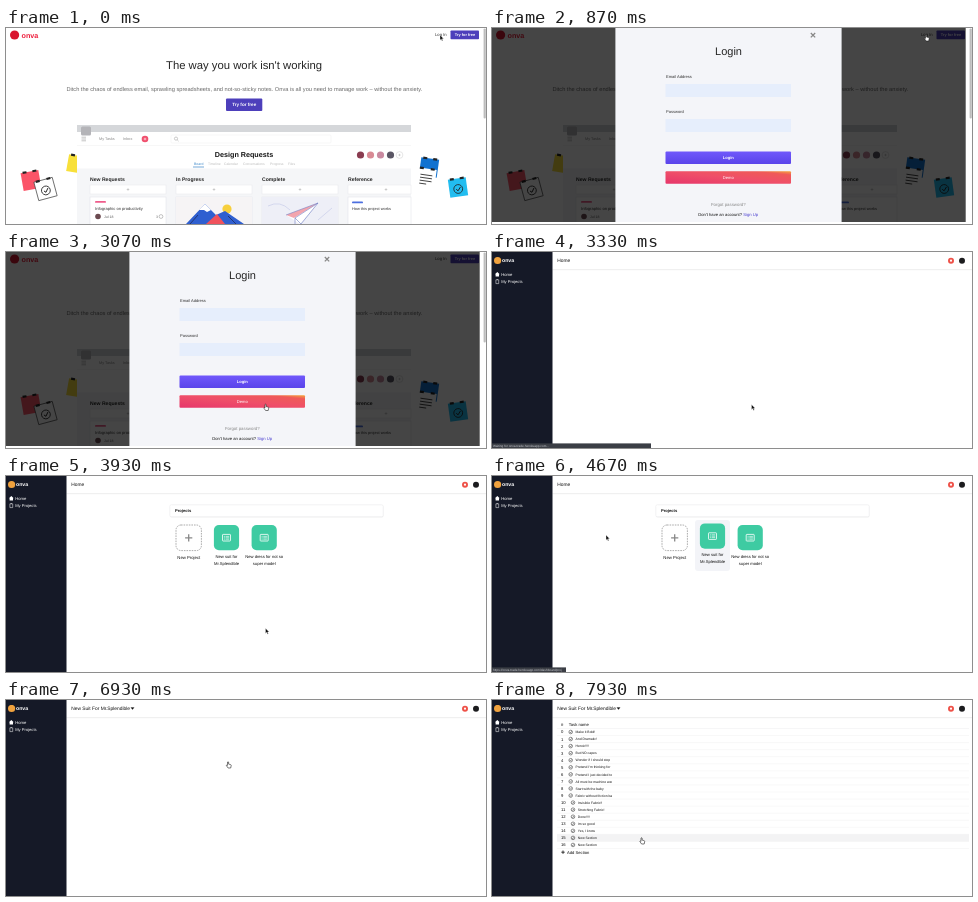
Animation, 480 px wide and 196 px high, one loop 8 s. Source, as an HTML page:

```html
<!DOCTYPE html>
<html lang="en">
<head>
<meta charset="utf-8">
<title>Onva walkthrough</title>
<style>
  html, body { margin: 0; width: 100%; height: 100%; overflow: hidden; background: #fff; }
  svg { display: block; width: 100vw; height: 100vh; }
  text { font-family: "Liberation Sans", Arial, sans-serif; text-rendering: geometricPrecision; white-space: pre; }
  .bold { font-weight: 700; }
</style>
</head>
<body>
<svg id="stage" viewBox="0 0 480 196" xmlns="http://www.w3.org/2000/svg"></svg>
<script>
const LOOP = 8000;
const stage = document.getElementById('stage');

// Markup helpers; text is placed by its vertical middle.
const rect = (x, y, w, h, fill, more = '') =>
  `<rect x="${x}" y="${y}" width="${w}" height="${h}" fill="${fill}" ${more}/>`;
const disc = (x, y, r, fill, more = '') =>
  `<circle cx="${x}" cy="${y}" r="${r}" fill="${fill}" ${more}/>`;
const line = (d, color, width = 0.6, more = '') =>
  `<path d="${d}" fill="none" stroke="${color}" stroke-width="${width}" ${more}/>`;
const shape = (d, fill) => `<path d="${d}" fill="${fill}"/>`;
const text = (x, y, size, fill, str, more = '') =>
  `<text x="${x}" y="${y + size * 0.35}" font-size="${size}" fill="${fill}" ${more}>${str}</text>`;
const mid = 'text-anchor="middle"';
const bold = 'class="bold"';
const group = (id, body, more = '') => `<g id="${id}" ${more}>${body}</g>`;
const plus = (x, y, r, color, width) =>
  line(`M${x - r} ${y}h${2 * r}M${x} ${y - r}v${2 * r}`, color, width);

const CHECK = disc(0, 1.5, 4.4, 'none', 'stroke="#222" stroke-width=".8"') +
  line('M-2 1.5l1.6 1.8l3-3.6', '#222', 0.9);
const LINES = line('M-6 -3h12M-6 0h12M-6 3h12M-6 6h7', '#222', 0.8);

function note(x, y, size, turn, fill, mark = '', edge = 'none') {
  const h = size / 2;
  return `<g transform="translate(${x} ${y}) rotate(${turn})">` +
    rect(-h, -h, size, size, fill, `stroke="${edge}" stroke-width=".7"`) +
    rect(-h + 2, -h - 1, 4, 2.2, '#222') + rect(h - 6, -h - 1, 4, 2.2, '#222') +
    mark + '</g>';
}

function board() {
  let s = rect(71, 97, 334, 99, '#fff') + rect(71, 97, 334, 7, '#d5d7da') +
    rect(75, 98.5, 10, 9, '#b4b4b8', 'rx="1.5"') +
    line('M75.5 109.2h4.5M75.5 111h4.5M75.5 112.8h4.5', '#888', 0.5) +
    text(93, 111, 3.8, '#888', 'My Tasks') + text(117, 111, 3.8, '#888', 'Inbox') +
    disc(139, 111, 3.3, '#f0506e') + plus(139, 111, 1.3, '#fff', 0.6) +
    rect(165, 107, 160, 8, '#fff', 'rx="1" stroke="#eee" stroke-width=".5"') +
    disc(170, 110.6, 1.6, 'none', 'stroke="#999" stroke-width=".5"') +
    line('M171.2 111.8l1.4 1.4', '#999', 0.5) +
    line('M71 117.5h334', '#eee', 0.5) +
    text(238, 126.5, 7.2, '#151515', 'Design Requests', `${mid} ${bold}`) +
    text(188, 136, 3.5, '#3a86c8', 'Board') + line('M187 139h11', '#3a86c8', 0.7);
  [[202, 'Timeline'], [218, 'Calendar'], [237, 'Conversations'], [264, 'Progress'], [282, 'Files']]
    .forEach(([x, label]) => s += text(x, 136, 3.4, '#bbb', label));
  ['#8a3c50', '#d88a94', '#c98aa0', '#5a5664']
    .forEach((c, i) => s += disc(354.5 + i * 10, 127, 3.6, c));
  s += disc(393.5, 127, 3.4, '#fff', 'stroke="#ccc" stroke-width=".5"') + plus(393.5, 127, 1.2, '#999', 0.4);
  s += rect(71, 140.5, 334, 55.5, '#f5f6f8');
  ['New Requests', 'In Progress', 'Complete', 'Reference'].forEach((label, i) => {
    const x = 84 + i * 86, w = i === 3 ? 63 : 76;
    s += text(x, 151, 5.1, '#222', label, bold) +
      rect(x, 157, w, 9, '#fff', 'stroke="#e5e6ea" stroke-width=".5"') +
      plus(x + 38, 161.5, 1.3, '#aaa', 0.5) +
      rect(x, 169, w, 30, '#fff', 'stroke="#dfe0e5" stroke-width=".5"');
  });
  s += rect(89, 173, 11, 1.8, '#ef5c8b', 'rx=".9"') +
    text(89, 180.5, 4.1, '#333', 'Infographic on productivity') +
    disc(92, 188.5, 2.8, '#6b4a50') + text(98, 189, 3.5, '#555', 'Jul 18') +
    text(150, 189, 3.5, '#666', '3') + disc(155, 188.5, 1.9, 'none', 'stroke="#888" stroke-width=".5"') +
    rect(346, 173.5, 11, 1.8, '#4c6fe0', 'rx=".9"') +
    text(346, 181, 3.9, '#333', 'How this project works');
  // Picture cards
  s += rect(170, 169, 76, 27, '#f6f4f5') + disc(221, 181, 4.6, '#f7cf3c') +
    shape('M180 196L199 176L210 187L219 183L238 196z', '#2f5fd0') +
    shape('M193 182L199 176L205 182L201 184L198 182z', '#fff') +
    shape('M200 196L211 186L219 196z', '#f0525c') +
    line('M184 196l8-9M222 188l8 8', '#1d2550', 0.7) +
    rect(256, 169, 76, 27, '#eeeff7') +
    shape('M280 187L312 175L294 196z', '#fff') + shape('M280 187L312 175L288 190z', '#f2a5ae') +
    line('M280 187L312 175L295 196L289 190L312 175M289 190v6', '#6f7fc4', 0.6) +
    line('M262 178q12-6 22 4M312 192l14-12', '#c9cdea', 0.7);
  return s;
}

function landing() {
  return rect(0, 0, 480, 196, '#fff') +
    disc(8.6, 7, 4.6, '#d9152f') + text(15.5, 7, 7.2, '#ee1f3d', 'onva', bold) +
    text(429, 7, 4.2, '#333', 'Log In') +
    rect(444.5, 2.5, 28.5, 8.8, '#4d3fbb', 'rx=".8"') +
    text(459, 7, 3.9, '#fff', 'Try for free', `${mid} ${bold}`) +
    text(238, 37.5, 11.3, '#262626', "The way you work isn't working", mid) +
    text(238.3, 61, 5.66, '#686868',
      'Ditch the chaos of endless email, sprawling spreadsheets, and not-so-sticky notes. Onva is all you need to manage work – without the anxiety.',
      mid) +
    rect(220, 70.5, 36.3, 12.5, '#4d3fbb', 'rx="1"') +
    text(238.2, 76.8, 4.6, '#fff', 'Try for free', `${mid} ${bold}`) +
    note(70, 136, 17, 10, '#f8e03a') + note(25, 152.5, 18, -10, '#fb5468') +
    note(39.5, 161, 19, -15, '#fff', CHECK, '#444') +
    note(423, 139.5, 18, 8, '#1172d0') + note(420, 150, 19, 8, '#fff', LINES) +
    note(452, 159.5, 18, -8, '#22bdf0', CHECK) + board();
}

const field = (y, label) =>
  text(174, y, 4.05, '#333', label) + rect(173.5, y + 7, 125.5, 13, '#e6eefc');

function modal() {
  return rect(0, 0, 473.7, 194, '#000', 'opacity=".73"') + rect(0, 194, 476, 2, '#fff') +
    rect(123.4, 0, 226.2, 194, '#f4f5f9') +
    line('M318.8 5l4.4 4.4M323.2 5l-4.4 4.4', '#888', 1.3) +
    text(236.5, 23, 11, '#262626', 'Login', mid) +
    field(49, 'Email Address') + field(84, 'Password') +
    rect(173.5, 123.5, 125.5, 12.5, 'url(#violet)', 'rx="1"') +
    text(236.3, 129.7, 4.1, '#fff', 'Login', `${mid} ${bold}`) +
    rect(173.5, 143.2, 125.5, 12.6, 'url(#coral)', 'rx="1"') +
    text(236.3, 149.5, 4.1, '#fff', 'Demo', mid) +
    text(236.3, 176, 4.35, '#888', 'Forgot password?', mid) +
    text(236.2, 187, 4.2, '#111', 'Don\'t have an account? <tspan fill="#4a3fd0">Sign Up</tspan>', mid);
}

function shell() {
  return rect(0, 0, 480, 196, '#fff') + rect(60.5, 17, 419.5, 1.2, '#f0f0f0') +
    rect(0, 0, 60.5, 196, '#151927') + group('menuHot', rect(0, 26, 60.5, 7.4, '#2b2f3c')) +
    disc(5.6, 8.5, 3.6, '#f0a23e') + text(10, 8.5, 5.2, '#fff', 'onva', bold) +
    shape('M2.9 22.3L5.3 20.1L7.7 22.3H7V24.4H3.6V22.3z', '#fff') +
    text(9.2, 22.3, 4.2, '#fff', 'Home') +
    line('M3.9 27.8h2.8v3.8h-2.8zM4.7 27.5h1.2', '#fff', 0.5) +
    text(9.2, 29.7, 4.1, '#fff', 'My Projects') +
    text(65.3, 8.7, 4.85, '#111', '', 'id="title"') +
    disc(459, 8.7, 3, '#ee5148') + disc(459, 8.7, 1.1, '#fff') + disc(470, 8.7, 3, '#1c1c1e');
}

function tile(id, cx, top, bottom) {
  return group(id + 'Bg', rect(cx - 17.5, 44, 35, 51, '#f3f4f8', 'rx="3"')) +
    group(id, rect(cx - 12.6, 49, 25.2, 25.3, '#3ecba2', 'rx="5"') +
      rect(cx - 4, 58.4, 8, 6.6, 'none', 'rx=".6" stroke="#fff" stroke-width=".8"') +
      line(`M${cx - 2.6} 60.4h1m.7 0h3.6M${cx - 2.6} 61.8h1m.7 0h3.6M${cx - 2.6} 63.2h1m.7 0h3.6`, '#fff', 0.6) +
      text(cx, 80.4, 4.15, '#111', top, mid) + text(cx, 87.3, 4.15, '#111', bottom, mid));
}

function projects() {
  return rect(164, 29.6, 213.5, 12, '#0000000d', 'rx="1.5"') +
    rect(163.8, 28.8, 213.4, 12, '#fff', 'rx="1.5" stroke="#e6e6e8" stroke-width=".5"') +
    text(169, 35, 4.1, '#111', 'Projects', bold) +
    rect(170, 49, 25.4, 25.6, '#fff', 'rx="5" stroke="#888" stroke-width=".7" stroke-dasharray="1.6 1"') +
    plus(182.7, 61.8, 3.6, '#888', 1.3) + text(182.8, 81.2, 4.25, '#111', 'New Project', mid) +
    tile('suit', 220.5, 'New suit for', 'Mr.Splendible') +
    tile('dress', 258.2, 'New dress for not so', 'super model');
}

const TASKS = ['Make it Bold!', 'And Dramatic!', 'Heroic!!!!', 'But NO capes', 'Wonder if I should stop',
  "Pretend I'm thinking for", 'Pretend I just decided to', 'All must be machine was', 'Start with the baby',
  'Fabric without friction ba', 'Invisible Fabric!!', 'Stretching Fabric!', 'Done!!!!', 'Im so good',
  'Yes, I know', 'New Section', 'New Section'];
const ROW = 7.06, FIRST = 32;

function tasks() {
  let s = group('rowHot', rect(65, -ROW / 2, 412, ROW, '#f3f3f4')) +
    text(69, 25, 4.2, '#111', '#') + text(76.7, 25, 4.2, '#111', 'Task name') +
    line('M65 28.5h412', '#e8e8ea', 0.4);
  TASKS.forEach((name, i) => {
    const y = FIRST + i * ROW, x = i < 10 ? 78.7 : 81;
    s += text(69, y, 4.2, '#111', i) +
      disc(x, y, 1.8, 'none', 'stroke="#222" stroke-width=".5"') +
      line(`M${x - 0.9} ${y}l.7 .8l1.2-1.5`, '#222', 0.5) +
      text(x + 4.8, y, 3.4, '#111', name, 'clip-path="url(#column)"') +
      line(`M65 ${y + ROW / 2}h412`, '#ececee', 0.4);
  });
  return s + plus(71, 152.2, 1.7, '#222', 0.9) + text(75, 152.2, 4.15, '#111', 'Add Section');
}

stage.innerHTML = `<defs>
  <linearGradient id="violet" x2="0" y2="1"><stop stop-color="#7058fb"/><stop offset="1" stop-color="#5a44ea"/></linearGradient>
  <linearGradient id="coral" x1="0" y1="1" x2="1" y2="0"><stop stop-color="#e6366b"/><stop offset=".5" stop-color="#ef4f69"/>
    <stop offset=".85" stop-color="#ef5a58"/><stop offset="1" stop-color="#f6a83c"/></linearGradient>
  <clipPath id="column"><rect x="60" y="18" width="60" height="178"/></clipPath></defs>` +
  group('landing', landing()) + group('modal', modal()) +
  group('scroll', rect(474, 0, 6, 196, '#fff') + rect(477.6, 0.5, 2.2, 90, '#bdbdbd', 'rx="1.1"')) +
  group('app', shell() + group('projects', projects()) + group('tasks', tasks()) +
    line('M124.9 7.6h3.2l-1.6 2z', '#111', 0.3, 'id="caret" style="fill:#111"') +
    group('status', rect(0, 191.4, 10, 4.6, '#3b3e45', 'id="statusBox"') +
      text(1, 193.8, 3.15, '#c9cbd0', '', 'id="statusText"'))) +
  group('arrow', '<path d="M0 0V5.2L1.2 4.1L2 6L2.9 5.6L2.1 3.8H3.7z" fill="#111" stroke="#fff" stroke-width=".35"/>') +
  group('hand', '<path d="M-.5 0q.6-.6 1.1 0V2.1l2 .5q.7.2.6 1L2.7 6H.1L-1.6 3.6q-.1-.8.6-.6l.5.4z" fill="#fff" stroke="#111" stroke-width=".55"/>');

const el = {};
stage.querySelectorAll('[id]').forEach(n => el[n.id] = n);

const ramp = (t, a, b) => Math.min(1, Math.max(0, (t - a) / (b - a)));
const ease = p => p * p * (3 - 2 * p);
const within = (t, a, b) => t >= a && t < b;
const show = (node, on) => node.setAttribute('visibility', on ? 'inherit' : 'hidden');
const move = (node, x, y) => node.setAttribute('transform', `translate(${x.toFixed(2)} ${y.toFixed(2)})`);
const hover = (t, a, b) => ease(ramp(t, a, a + 150)) * (1 - ease(ramp(t, b, b + 200)));

// Pointer stops: time, x, y, eased.
const PATH = [
  [0, 434, 7, 1], [1270, 434, 7, 1], [2050, 262, 149.5, 1], [2950, 262, 149.5, 1],
  [3070, 259.5, 152.5, 1], [3930, 259.5, 152.5, 1], [4130, 258, 96, 0], [4330, 244, 66, 0],
  [4670, 114, 59, 0], [5000, 22, 30, 1], [5980, 22, 30, 1], [6700, 222, 62, 1],
  [7000, 222, 62, 1], [7750, 149.5, 138, 1], [LOOP, 149.5, 138, 1]
];

function pointer(t) {
  const i = PATH.findIndex(p => p[0] > t);
  const [t0, x0, y0] = PATH[i - 1], [t1, x1, y1, soft] = PATH[i];
  const k = ramp(t, t0, t1), p = soft ? ease(k) : k;
  return [x0 + (x1 - x0) * p, y0 + (y1 - y0) * p];
}

const SITE = 'onva-trade.herokuapp.com';
const STATUS = [
  [3330, 3800, 159, `Waiting for ${SITE}...`],
  [4080, 4800, 74, `https://${SITE}/dashboard/proj`],
  [4930, 6100, 67, `https://${SITE}/#/projects`],
  [6380, 6930, 74, `https://${SITE}/dashboard/proj`]
];

function lift(name, k) {
  move(el[name], 0, -1.6 * k);
  el[name + 'Bg'].setAttribute('opacity', k);
}

function draw(t) {
  const inApp = t >= 3330, detail = t >= 6930;
  const [x, y] = pointer(t);

  show(el.landing, !inApp);
  show(el.scroll, !inApp);
  show(el.modal, within(t, 800, 3330));
  el.modal.setAttribute('opacity', ramp(t, 720, 860));
  show(el.app, inApp);

  el.title.textContent = detail ? 'New Suit For Mr.Splendible' : t >= 5800 ? 'Projects' : 'Home';
  show(el.caret, detail);
  show(el.projects, within(t, 3600, 6930));
  lift('dress', hover(t, 4080, 4330));
  lift('suit', Math.max(hover(t, 4330, 4670), hover(t, 6390, 7000)));
  show(el.menuHot, within(t, 4930, 6100));

  show(el.tasks, t >= 7060);
  const row = Math.round((y + 2 - FIRST) / ROW);
  show(el.rowHot, t >= 7060 && row >= 0 && row < TASKS.length);
  move(el.rowHot, 0, FIRST + row * ROW);

  const status = STATUS.find(s => within(t, s[0], s[1]));
  show(el.status, status);
  if (status) {
    el.statusBox.setAttribute('width', status[2]);
    el.statusText.textContent = status[3];
  }

  const hand = within(t, 70, 1330) || within(t, 1930, 3330) || within(t, 4080, 4560) ||
    within(t, 4930, 6100) || t >= 6380;
  show(el.hand, hand);
  show(el.arrow, !hand);
  move(hand ? el.hand : el.arrow, x, y);
}

const start = performance.now();
function tick() {
  draw((performance.now() - start) % LOOP);
  requestAnimationFrame(tick);
}
tick();
</script>
</body>
</html>
```
